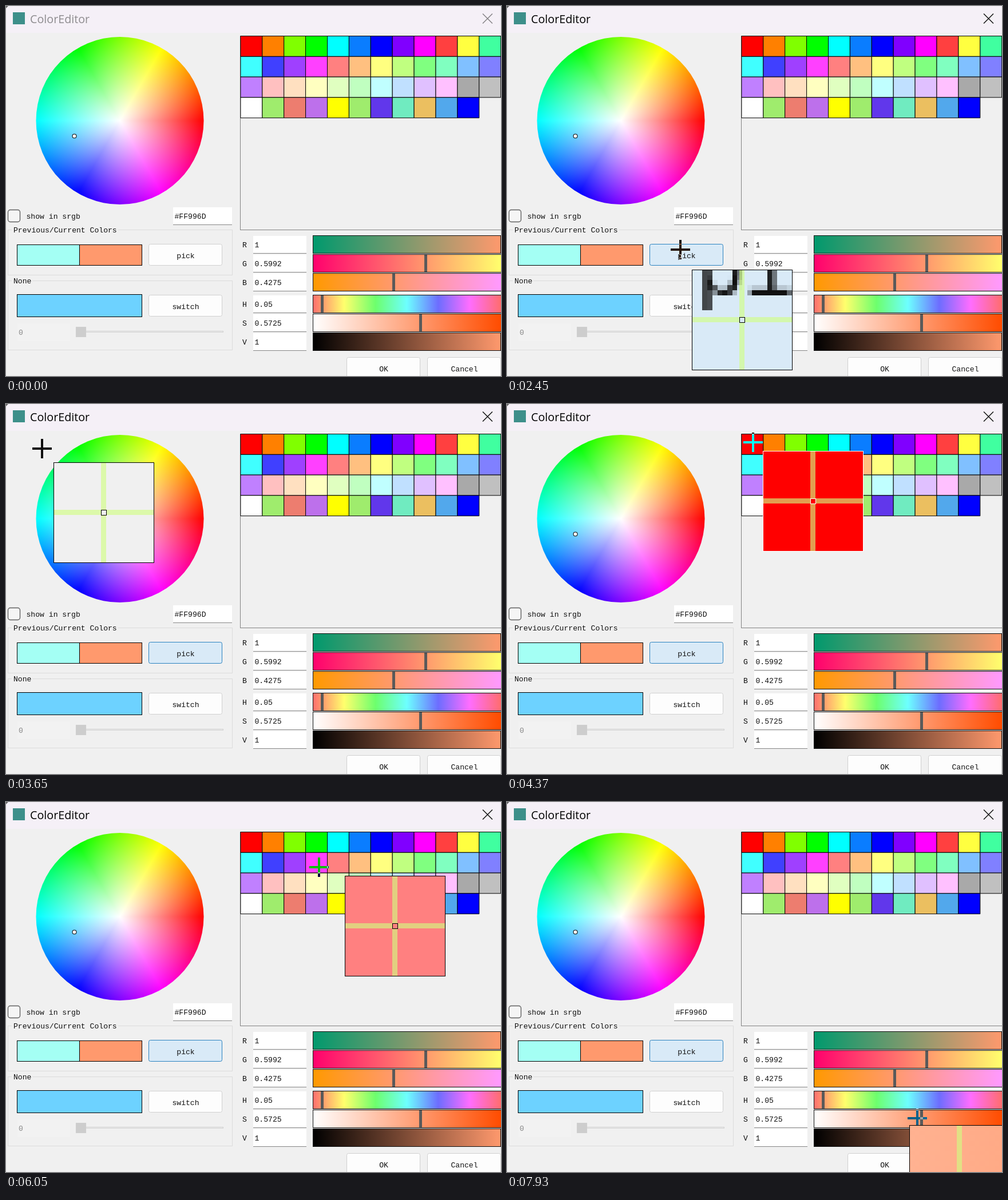
Write an HTML page with a canvas that moves like this. It is 865 px wide and 647 px high and loops after 8 s.

```html
<!DOCTYPE html>
<html lang="en">
<head>
<meta charset="utf-8">
<title>ColorEditor</title>
<style>
html, body { margin: 0; width: 100%; height: 100%; overflow: hidden; background: #f0f0f0; }
canvas { display: block; }
</style>
</head>
<body>
<canvas id="stage" width="865" height="647"></canvas>
<script>
const W = 865, H = 647, LOOP = 8000, STEP = 40;
const stage = document.getElementById('stage').getContext('2d');

// Denser copy of the window, read by the magnifier
const DENSITY = 1.266, CELLS = 20, LENS = 174;
const lensCanvas = document.createElement('canvas');
lensCanvas.width = Math.ceil(W * DENSITY);
lensCanvas.height = Math.ceil(H * DENSITY);
const lensCtx = lensCanvas.getContext('2d', { willReadFrequently: true });
lensCtx.scale(DENSITY, DENSITY);

const MONO = '13.1px "Liberation Mono", "DejaVu Sans Mono", monospace';
const TITLE = '19.7px "Open Sans", "Noto Sans", sans-serif';

const PALETTE = [
  'f00 ff8000 80ff00 0f0 0ff 0a7dff 00f 8000ff f0f ff4040 ffff40 40ffa0',
  '40ffff 4040ff 9f40ff ff40ff ff8080 ffc080 ffff80 c0ff80 80ff80 80ffc0 80c0ff 8080ff',
  'c080ff ffc0c0 ffe0c0 ffffc0 e0ffc0 c0ffc0 c0ffff c0e0ff e0c0ff ffc0ff a9a9a9 c0c0c0',
  'fff 9fec6d ed7d6f bd70eb ff0 9fec6d 6137eb 70ebc0 ebbf60 52a8ec 00f'
].map(row => row.split(' '));

const CHANNELS = [
  { name: 'R', y: 401, value: 1, stops: ['#00996d', '#ff996d'] },
  { name: 'G', y: 434, value: 0.5992, stops: ['#ff006d', '#ffff6d'] },
  { name: 'B', y: 467, value: 0.4275, stops: ['#ff9900', '#ff99ff'] },
  { name: 'H', y: 505, value: 0.05,
    stops: ['#ff6d6d', '#ffff6d', '#6dff6d', '#6dffff', '#6d6dff', '#ff6dff', '#ff6d6d'] },
  { name: 'S', y: 538, value: 0.5725, stops: ['#fff', '#ff4c00'] },
  { name: 'V', y: 571, value: 1, stops: ['#000', '#ff996d'] }
];

// Picker path: time, x, y
const PATH = [
  [2410, 306, 445], [2450, 303, 426], [2800, 268, 200], [3010, 256, 167], [3050, 253, 165],
  [3250, 168, 130], [3450, 100, 112], [3650, 63, 78], [3850, 88, 32], [3990, 130, 17],
  [4130, 211, 40], [4330, 430, 66], [4370, 430, 67], [4970, 700, 68], [5170, 812, 70],
  [5350, 846, 88], [5500, 842, 110], [5650, 806, 117], [5850, 695, 116], [6010, 575, 113],
  [6050, 547, 114], [6170, 472, 120], [6250, 466, 134], [6370, 530, 146], [6650, 745, 166],
  [6890, 780, 262], [7090, 770, 402], [7130, 769, 424], [7330, 610, 426], [7530, 453, 431],
  [7610, 451, 452], [7730, 530, 520], [7890, 686, 549], [7930, 717, 553]
];

const clamp = (v, a = 0, b = 1) => Math.min(b, Math.max(a, v));

function slope(i, k) {
  const a = PATH[Math.max(0, i - 1)], b = PATH[Math.min(PATH.length - 1, i + 1)];
  return (b[k] - a[k]) / (b[0] - a[0]);
}

function pickerAt(t) {
  t = clamp(t, PATH[0][0], PATH[PATH.length - 1][0]);
  let i = 0;
  while (i < PATH.length - 2 && t > PATH[i + 1][0]) i++;
  const p = PATH[i], q = PATH[i + 1], span = q[0] - p[0];
  const u = (t - p[0]) / span, v = 1 - u;
  return [1, 2].map(k =>
    v * v * (1 + 2 * u) * p[k] + u * u * (3 - 2 * u) * q[k] +
    span * u * v * (v * slope(i, k) - u * slope(i + 1, k)));
}

function rect(c, x, y, w, h, fill) {
  c.fillStyle = fill;
  c.fillRect(x, y, w, h);
}

function frame(c, x, y, w, h, color) {
  c.strokeStyle = color;
  c.lineWidth = 1;
  c.strokeRect(x + 0.5, y + 0.5, w - 1, h - 1);
}

function rounded(c, x, y, w, h, r, fill, edge, width = 1) {
  c.beginPath();
  c.roundRect(x + 0.5, y + 0.5, w - 1, h - 1, r);
  c.fillStyle = fill;
  c.fill();
  c.strokeStyle = edge;
  c.lineWidth = width;
  c.stroke();
}

function text(c, s, x, y, color = '#111', align = 'left', font = MONO) {
  c.font = font;
  c.textAlign = align;
  c.fillStyle = color;
  c.fillText(s, x, y);
}

function button(c, label, x, y, hot = 0) {
  rounded(c, x, y, 129, 38, 3, '#fdfdfd', '#d0d0d0');
  if (hot) {
    c.globalAlpha = hot;
    rounded(c, x, y, 129, 38, 3, '#d9eaf7', '#2a82c0');
    c.globalAlpha = 1;
  }
  text(c, label, x + 65, y + 24.6, '#111', 'center');
}

function field(c, s, x, y, w) {
  rect(c, x, y, w, 31, '#fff');
  rect(c, x, y + 30, w, 1, '#868686');
  text(c, s, x + 2.5, y + 20);
}

function group(c, label, y, h) {
  frame(c, 3, y, 393, h, '#dcdcdc');
  rect(c, 10, y - 2, label.length * 7.86 + 5, 5, '#f0f0f0');
  text(c, label, 13, y + 5);
}

function wheel(c, x, y, r) {
  const hue = c.createConicGradient(0, x, y);
  ['#f00', '#f0f', '#00f', '#0ff', '#0f0', '#ff0', '#f00'].forEach((s, i) => hue.addColorStop(i / 6, s));
  const white = c.createRadialGradient(x, y, 0, x, y, r);
  white.addColorStop(0, 'rgba(255,255,255,1)');
  white.addColorStop(1, 'rgba(255,255,255,0)');
  c.beginPath();
  c.arc(x, y, r, 0, 7);
  for (const fill of [hue, white]) {
    c.fillStyle = fill;
    c.fill();
  }
  c.beginPath();
  c.arc(119.5, 227.5, 3.5, 0, 7);
  c.fillStyle = '#fff';
  c.fill();
  c.strokeStyle = '#111';
  c.lineWidth = 1.1;
  c.stroke();
}

function titleBar(c, active) {
  rect(c, 0, 0, W, 47, '#f5f0f7');
  c.fillStyle = '#666';
  c.beginPath();
  c.moveTo(0, 0);
  c.lineTo(4, 0);
  c.lineTo(0, 4);
  c.fill();
  rect(c, 12, 11, 21, 21, '#3d8f8a');
  text(c, 'ColorEditor', 42, 30, active ? '#000' : '#8e8c8f', 'left', TITLE);
  c.strokeStyle = active ? '#111' : '#858386';
  c.lineWidth = 1.5;
  c.beginPath();
  c.moveTo(833, 13.5);
  c.lineTo(850, 30.5);
  c.moveTo(850, 13.5);
  c.lineTo(833, 30.5);
  c.stroke();
}

function palette(c) {
  const dx = 37.9, dy = 35.8;
  rect(c, 409, 52, 1, 340, '#828282');
  rect(c, 409, 52, W - 409, 1, '#828282');
  rect(c, 409, 391, W - 409, 1, '#828282');
  c.strokeStyle = '#000';
  c.lineWidth = 1;
  PALETTE.forEach((row, j) => row.forEach((color, i) => {
    c.beginPath();
    c.rect(409.9 + i * dx, 52.5 + j * dy, dx, dy);
    c.fillStyle = '#' + color;
    c.fill();
    c.stroke();
  }));
}

function channel(c, ch) {
  const { y, value } = ch, width = value === 1 ? 329 : 331;
  text(c, ch.name, 413, y + 21);
  field(c, String(value), 432, y + 1, 93);
  const g = c.createLinearGradient(536, 0, 865, 0);
  ch.stops.forEach((s, i) => g.addColorStop(i / (ch.stops.length - 1), s));
  rect(c, 536, y, width, 32, g);
  frame(c, 536, y, width, 32, '#111');
  if (value < 1) rect(c, Math.round(536 + 329 * value) - 2, y + 1, 5, 30, '#5a5a5a');
}

function drawWindow(c, active, hot) {
  rect(c, 0, 0, W, H, '#f0f0f0');
  titleBar(c, active);
  wheel(c, 199, 200.5, 146.5);
  palette(c);

  rounded(c, 3, 356, 22, 22, 4, '#f5f5f5', '#606060', 1.4);
  text(c, 'show in srgb', 35.5, 372);
  field(c, '#FF996D', 292, 352, 103);

  group(c, 'Previous/Current Colors', 391, 80);
  rect(c, 19, 417, 110, 36, '#a4fff4');
  rect(c, 129, 417, 109, 36, '#ff996d');
  frame(c, 19, 417, 110, 37, '#000');
  frame(c, 128, 417, 110, 37, '#000');
  button(c, 'pick', 249, 416, hot);

  group(c, 'None', 480, 122);
  rect(c, 19, 504, 219, 40, '#6dd2ff');
  frame(c, 19, 504, 219, 40, '#000');
  button(c, 'switch', 249, 505);
  rect(c, 20, 555, 92, 31, '#f2f2f2');
  text(c, '0', 22, 575, '#8a8a8a');
  rect(c, 122, 568, 258, 3, '#d2d2d2');
  rect(c, 123, 569, 256, 1, '#ececec');
  rect(c, 122, 561, 18, 18, '#cdcdcd');

  CHANNELS.forEach(ch => channel(c, ch));
  button(c, 'OK', 595, 614);
  button(c, 'Cancel', 736, 614);
}

function cross(c, [x, y]) {
  x = Math.round(x);
  y = Math.round(y);
  c.globalCompositeOperation = 'difference';
  c.fillStyle = '#fff';
  c.beginPath();
  c.rect(x - 17, y - 2, 34, 4);
  c.rect(x - 2, y - 17, 4, 15);
  c.rect(x - 2, y + 2, 4, 15);
  c.fill();
  c.globalCompositeOperation = 'source-over';
}

function magnifier(c, [x, y]) {
  const left = Math.round(x + 18), top = Math.round(y + 17.4);
  const sx = Math.round(x * DENSITY), sy = Math.round(y * DENSITY);
  const [r, g, b] = lensCtx.getImageData(sx, sy, 1, 1).data;
  const edge = 0.3 * r + 0.59 * g + 0.11 * b < 100 ? '#fff' : '#000';

  rect(c, left, top, LENS, LENS, '#f0f0f0');
  c.imageSmoothingEnabled = false;
  c.drawImage(lensCanvas, sx - CELLS / 2, sy - CELLS / 2, CELLS, CELLS, left, top, LENS, LENS);
  const bar = 82, end = bar + 9, tint = 'rgba(208,255,128,0.625)';
  rect(c, left + bar, top, 9, LENS, tint);
  rect(c, left, top + bar, bar, 9, tint);
  rect(c, left + end, top + bar, LENS - end, 9, tint);
  rect(c, left + bar, top + bar, 10, 10, `rgb(${r},${g},${b})`);
  frame(c, left + bar, top + bar, 10, 10, edge);
  frame(c, left - 1, top - 1, LENS + 2, LENS + 2, edge);
}

function arrow(c, x, y) {
  const shape = [[0, 0], [0, 16], [4, 12.5], [6.6, 18], [9, 17], [6.5, 11.5], [11.5, 11.5]];
  c.beginPath();
  shape.forEach(([dx, dy]) => c.lineTo(x + dx, y + dy));
  c.closePath();
  c.fillStyle = '#fff';
  c.fill();
  c.strokeStyle = '#000';
  c.lineWidth = 1;
  c.stroke();
}

function render(t) {
  const active = t >= 120 && !(t >= 1600 && t < 1840);
  const hot = clamp((t - 1260) / 140);
  drawWindow(stage, active, hot);
  if (t >= 1840) {
    drawWindow(lensCtx, active, hot);
    cross(stage, pickerAt(t));
    magnifier(stage, pickerAt(t - STEP));
  } else if (t >= 160) {
    const u = clamp((t - 480) / 840), e = u * u * (3 - 2 * u);
    arrow(stage, 734 - 428 * e, 632 - 190 * e);
  }
}

let shown = -1;
function tick() {
  const t = performance.now() % LOOP;
  const step = Math.max(0, Math.floor((t - 10) / STEP) * STEP + 10);
  if (step !== shown) render(shown = step);
  requestAnimationFrame(tick);
}
tick();
</script>
</body>
</html>
```
